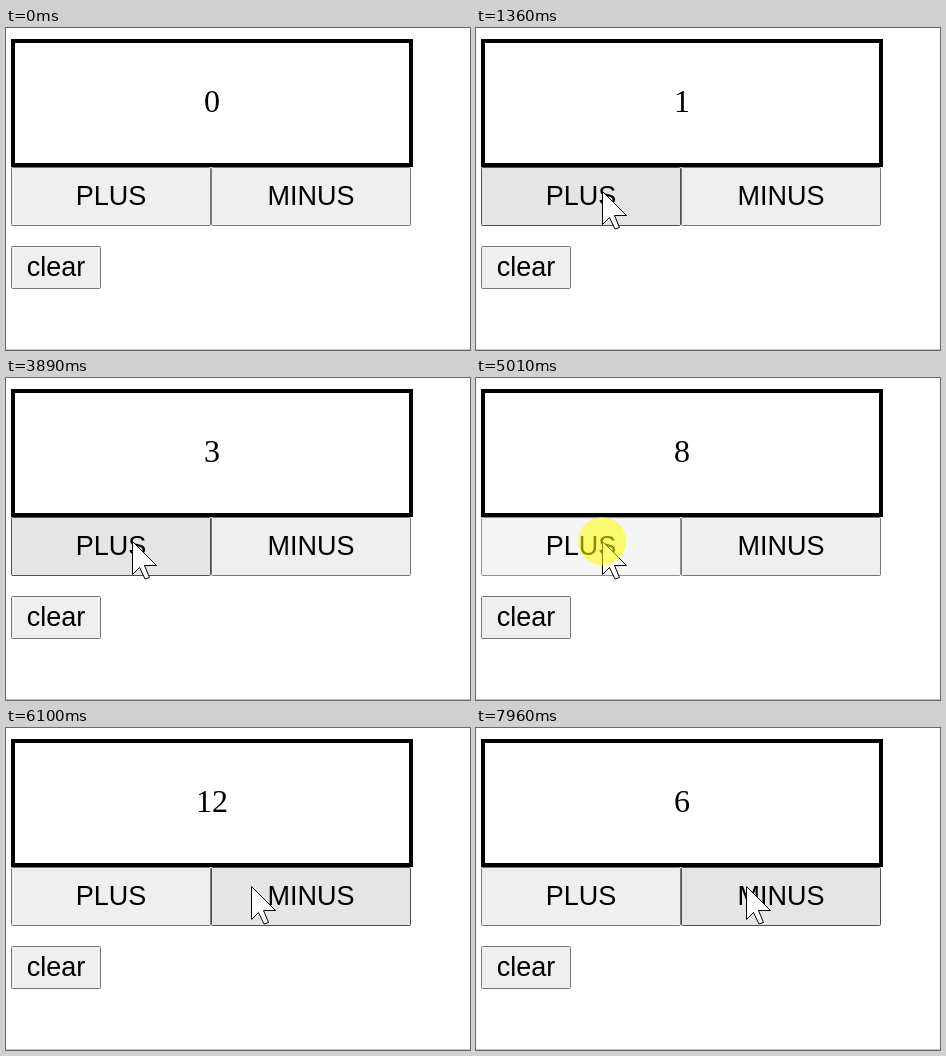
An HTML page that plays this animation: 464 by 322 pixels, repeating every 8 s.

```html
<!DOCTYPE html>
<html lang="en">
<head>
<meta charset="utf-8">
<title>Counter</title>
<style>
  html, body { margin: 0; width: 464px; height: 322px; overflow: hidden; background: #fff; }
  svg { display: block; }
  text { font: 27px "Liberation Sans", Arial, sans-serif; text-anchor: middle; }
  #count { font: 32px "Liberation Serif", "Times New Roman", serif; }
  .button { fill: #efefef; stroke: #767676; }
  .button.hover { fill: #e5e5e5; stroke: #4f4f4f; }
  .button.active { fill: #f5f5f5; stroke: #8d8d8d; }
</style>
</head>
<body>
<svg width="464" height="322">
  <rect x="7" y="13" width="398" height="124" fill="none" stroke="#000" stroke-width="4"/>
  <text id="count" x="206" y="84">0</text>
  <rect id="plus" class="button" x="5.5" y="139.5" width="199" height="58" rx="1"/>
  <rect id="minus" class="button" x="205.5" y="139.5" width="199" height="58" rx="1"/>
  <rect class="button" x="5.5" y="218.5" width="89" height="42" rx="1"/>
  <text x="105" y="177">PLUS</text>
  <text x="305" y="177">MINUS</text>
  <text x="50" y="248">clear</text>
  <path d="M0 321.5H464" stroke="#c4c4c4"/>
  <g id="cursor">
    <path d="M.5 .5V33.5L7.5 26.5L13 38L17.5 36.5L12.5 24.5H24.5Z" fill="#fff" stroke="#000"/>
    <circle id="glow" r="24" fill="#ff0" fill-opacity=".55"/>
  </g>
</svg>
<script>
const LOOP = 8000, ENTER = 280, CROSS = 5970;
const PRESS = 85;   // how long a quick click is held before it counts
const LINGER = 45;  // how long the glow outlasts the click

const [count, plus, minus, cursor, glow] =
  ["count", "plus", "minus", "cursor", "glow"].map(id => document.getElementById(id));

// Each run starts with a held press, then repeats quick clicks at a steady pace
const runs = [
  { down: 1160, up: 1310 },
  { down: 3020, up: 3240 },
  { down: 3620, up: 3840 },
  { down: 4090, up: 4309, clicks: 9, period: 175 },
  { down: 6500, up: 6720 },
  { down: 6900, up: 7180, clicks: 5, period: 183 }
];

function mouse(t) {
  let value = 0, held = false;
  for (const { down, up, clicks = 1, period = 0 } of runs) {
    for (let i = 0; i < clicks; i++) {
      const release = up + i * period;
      const press = i ? release - PRESS : down;
      if (t >= release) value += down < CROSS ? 1 : -1;
      held ||= t >= press && t < release + LINGER;
    }
  }
  return { value, held };
}

function stepped(t, start, interval, first, total, power) {
  if (t < start) return 0;
  const k = Math.min(total, Math.floor((t - start) / interval) + first);
  return 1 - (1 - k / total) ** power;
}

function pointer(t) {
  const enter = stepped(t, ENTER, 66.25, 0, 8, 2);
  const cross = stepped(t, CROSS, 65, 1, 6, 2.55);
  return [247 - 121 * enter + 144 * cross, 266 - 103 * enter - 5 * cross].map(Math.floor);
}

function setState(button, over, held) {
  button.setAttribute("class", "button" + (over ? (held ? " active" : " hover") : ""));
}

function draw(now) {
  const t = now % LOOP;
  const { value, held } = mouse(t);
  const [x, y] = pointer(t);
  const visible = t >= ENTER;
  const inRow = visible && y >= 139 && y < 198;

  count.textContent = value;
  setState(plus, inRow && x < 205, held);
  setState(minus, inRow && x >= 205, held);
  cursor.setAttribute("transform", `translate(${x} ${y})`);
  cursor.setAttribute("visibility", visible ? "visible" : "hidden");
  glow.setAttribute("opacity", held ? 1 : 0);
  requestAnimationFrame(draw);
}
draw(0);
</script>
</body>
</html>
```
